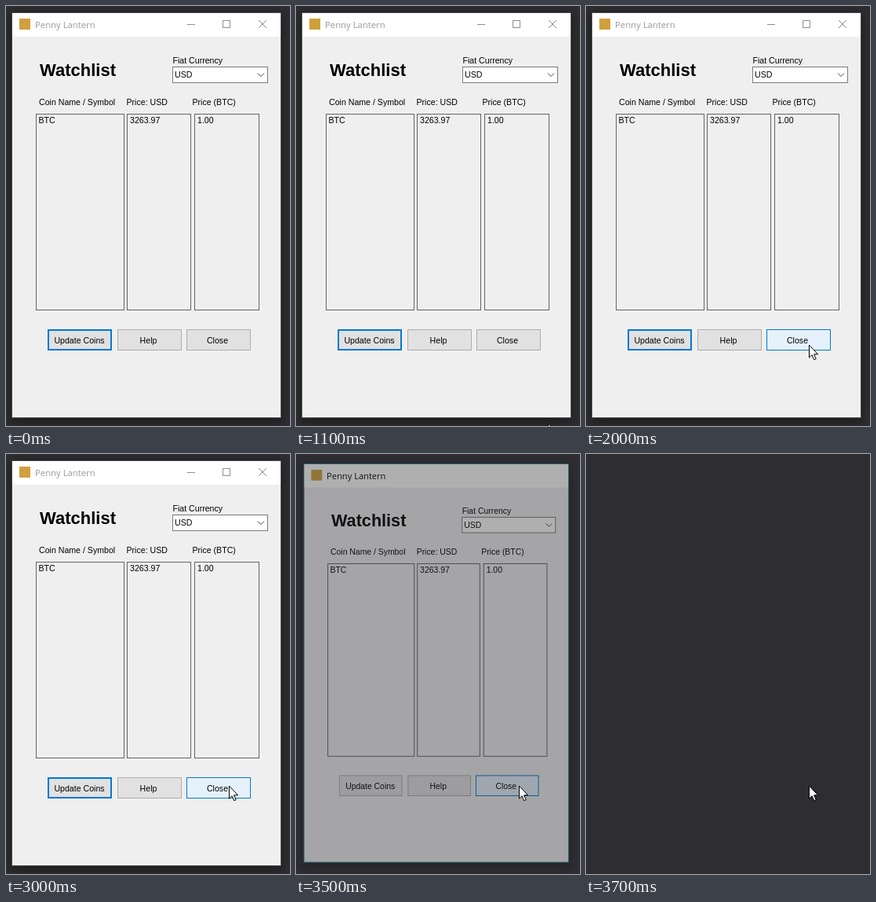
An HTML page for the animation above (7.1 s loop, 362 px wide and 534 px high).

```html
<!DOCTYPE html>
<html lang="en">
<head>
<meta charset="utf-8">
<title>Watchlist</title>
<style>
  html, body { margin: 0; height: 100%; overflow: hidden; background: #2e2d31; }
  svg { display: block; width: 100%; height: 100%; }
  text { font: 10.6px "Liberation Sans", Arial, sans-serif; fill: #000; white-space: pre; }
  .title { font: 11.3px "Open Sans", "Noto Sans", sans-serif; fill: #999; }
  .heading { font-size: 22px; font-weight: bold; }
  .list { fill: #efefef; stroke: #646464; }
  .caption { fill: none; stroke: #8c8c8c; }
  .button rect { fill: #e1e1e1; stroke: #adadad; }
  .button.focus rect { x: 54px; y: 412px; width: 80px; height: 25px; stroke: #0078d7; stroke-width: 2; }
  .button.hover rect { fill: #e5f1fb; stroke: #0078d7; }
  .button.pressed rect { fill: #cce4f7; stroke: #005499; }
  #frame { fill: #efefef; stroke: #48484b; }
  .active #frame { stroke: #1a8296; }
  .active .title { fill: #000; }
</style>
</head>
<body>
<svg viewBox="0 0 362 534">
  <defs>
    <filter id="blur" x="-20%" y="-20%" width="140%" height="140%"><feGaussianBlur stdDeviation="6"/></filter>
  </defs>
  <rect width="362" height="534" fill="#2e2d31"/>
  <g id="win">
    <rect x="6" y="9" width="346" height="520" opacity=".4" filter="url(#blur)"/>
    <rect id="frame" x="7.5" y="8.5" width="343" height="515"/>
    <rect x="8" y="9" width="342" height="30" fill="#fff"/>
    <rect x="17" y="16" width="14" height="14" fill="#d0a03c"/>
    <text class="title" x="37" y="28">Penny Lantern</text>
    <path id="controls" class="caption" d="M231 23.5h10M276.5 18.5h9v9h-9zM322 18l10 10M332 18l-10 10"/>

    <text class="heading" x="43" y="89">Watchlist</text>
    <text x="212.5" y="73">Fiat Currency</text>
    <rect x="212.5" y="77.5" width="121" height="20" fill="#fff" stroke="#7a7a7a"/>
    <text x="215" y="91">USD</text>
    <path d="M321 85.5l4 4 4-4" fill="none" stroke="#444"/>

    <text x="42" y="126">Coin Name / Symbol</text>
    <text x="153.5" y="126">Price: USD</text>
    <text x="237.5" y="126">Price (BTC)</text>
    <rect class="list" x="38.5" y="137.5" width="112" height="249"/>
    <rect class="list" x="154.5" y="137.5" width="81" height="249"/>
    <rect class="list" x="240.5" y="137.5" width="82" height="249"/>
    <text x="41.5" y="149">BTC</text>
    <text x="158" y="149">3263.97</text>
    <text x="244" y="149">1.00</text>

    <g id="update" class="button">
      <rect x="53.5" y="411.5" width="81" height="26"/>
      <text x="93.5" y="429" text-anchor="middle">Update Coins</text>
    </g>
    <g class="button">
      <rect x="142.5" y="411.5" width="81" height="26"/>
      <text x="181.5" y="429" text-anchor="middle">Help</text>
    </g>
    <g id="close" class="button">
      <rect x="230.5" y="411.5" width="81" height="26"/>
      <text x="269.5" y="429" text-anchor="middle">Close</text>
    </g>
  </g>
  <path id="cursor" d="M.5 1v16l3.6-3.3 2.6 6 2.5-1.1-2.6-5.8h5z" fill="#fff" stroke="#000"/>
</svg>
<script>
const LOOP = 7100, STEP = 100;
const PRESS = 3300, RELEASE = 3400, FADE_START = 3425, FADE_TIME = 197;
// time, x, y of the pointer tip
const path = [
  [1100, 321, 530], [1500, 305, 495], [1800, 289, 460],
  [1900, 285, 442], [2000, 284, 430], [2400, 284, 421]
];
const $ = id => document.getElementById(id);
const win = $("win"), update = $("update"), close = $("close");
const controls = $("controls"), cursor = $("cursor");

function pointer(t) {
  const i = path.findIndex(p => p[0] > t);
  if (i < 0) return path[path.length - 1].slice(1);
  if (i === 0) return [path[0][1], 560];
  const [t0, x0, y0] = path[i - 1], [t1, x1, y1] = path[i];
  const k = (t - t0) / (t1 - t0);
  return [x0 + (x1 - x0) * k, y0 + (y1 - y0) * k];
}

function draw(t) {
  const [x, y] = pointer(t).map(Math.round);
  const clicked = t >= PRESS;
  cursor.setAttribute("transform", `translate(${x} ${y})`);

  win.setAttribute("class", clicked ? "active" : "");
  update.setAttribute("class", clicked ? "button" : "button focus");
  const state = clicked && t < RELEASE ? "pressed" : y < 438 ? "hover" : "";
  close.setAttribute("class", "button " + state);

  // Closing: the window shrinks while it fades
  const p = Math.min(1, Math.max(0, (t - FADE_START) / FADE_TIME));
  const scale = 1 - 0.0435 * p;
  win.setAttribute("opacity", 1 - p);
  win.setAttribute("transform", `translate(165 256) scale(${scale}) translate(-165 -256)`);
  controls.setAttribute("opacity", p > 0 ? 0 : 1);
}

const start = performance.now();
function tick() {
  const t = (performance.now() - start) % LOOP;
  draw(Math.floor(t / STEP) * STEP);
  requestAnimationFrame(tick);
}
tick();
</script>
</body>
</html>
```
